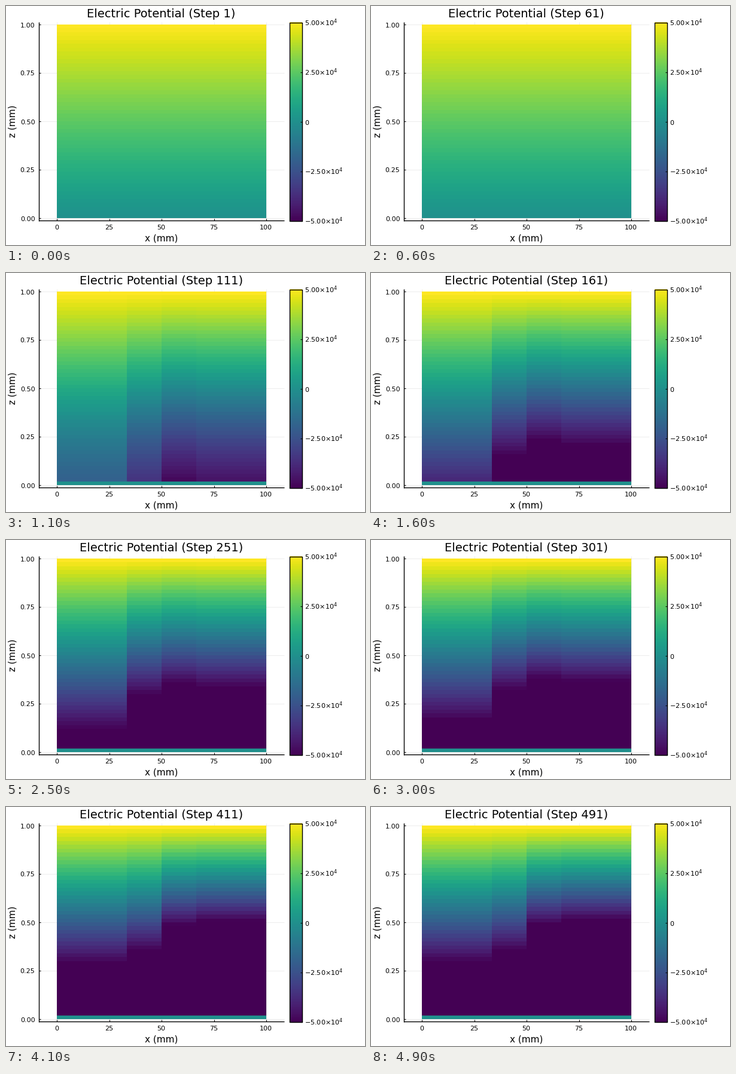
Write a matplotlib script that moves like this. It is 600 px wide and 400 px high and loops after 5 s.

```python
import numpy as np
import matplotlib.pyplot as plt
from matplotlib.animation import FuncAnimation

plt.rcParams["font.family"] = "DejaVu Sans"

FRAMES, INTERVAL = 50, 100
ROWS = 50
LEFT, RIGHT, TOP, BOTTOM = 85, 435, 31, 355        # heatmap, in pixels
AX_LEFT, AX_RIGHT, AX_TOP, AX_BOTTOM = 55.3, 465, 27, 359.3
BAR_LEFT, BAR_RIGHT, BAR_TOP, BAR_BOTTOM = 473.5, 494.5, 27.5, 360.3

ONSET = 6                   # first charge arrives after this frame
SURGE_START, SURGE_END = 35, 42
SAG_PEAK = 6
ZONE_OF_COLUMN = [0, 0, 1, 2, 3, 3]

# Per zone: start frame, first charge, its time constant, late surge (10 kV)
START, CHARGE, TAU, SURGE = np.array([
    (7.5, 8.4, 13, 1.3),
    (7.4, 10.4, 8.5, .2),
    (6, 12, 9.5, 2.9),
    (6, 11.7, 10, 4.2),
]).T


def smoothstep(t):
    t = np.clip(t, 0, 1)
    return t * t * (3 - 2 * t)


def surface_potential(frame):
    """Each zone charges up exponentially, surges once, then holds."""
    frame = min(frame, SURGE_END)
    age = np.maximum(frame - START, 0)
    surge = smoothstep((frame - SURGE_START) / (SURGE_END - SURGE_START))
    return -CHARGE * (1 - np.exp(-age / TAU)) - SURGE * surge


def sag(frame):
    """Dip caused by charge still in flight: a quick rise and slow decay."""
    age = max(min(frame, SURGE_END) - ONSET, 0) / 2
    return SAG_PEAK * age * np.exp(1 - age)


def potential(frame):
    z = np.arange(ROWS)[:, None] / (ROWS - 1)
    surface = surface_potential(frame)[ZONE_OF_COLUMN]
    field = surface + (5 - surface) * z - sag(frame) * z * (1 - z) ** 2
    field[0] = 0          # grounded plate
    return field


fig = plt.figure(figsize=(6, 4), dpi=100, facecolor="white")
ax = fig.add_axes([0, 0, 1, 1])
ax.axis("off")


def line(xs, ys, width=1.0, color="black", **kw):
    ax.plot(xs, ys, color=color, lw=width, solid_capstyle="butt", **kw)


def label(x, y, text, size=8, ha="center", va="baseline", **kw):
    return ax.text(x, y, text, fontsize=size, ha=ha, va=va, **kw)


def picture(data, extent):
    return ax.imshow(data, extent=extent, origin="lower", cmap="viridis",
                     vmin=-5, vmax=5, aspect="auto",
                     interpolation="nearest", zorder=2)


# Ticks and grid
for i in range(5):
    x = LEFT + (RIGHT - LEFT) * i / 4
    y = BOTTOM - (BOTTOM - TOP) * i / 4
    line([x, x], [AX_TOP, AX_BOTTOM], .5, alpha=.1, zorder=1)
    line([AX_LEFT, AX_RIGHT], [y, y], .5, alpha=.1, zorder=1)
    line([x, x], [AX_BOTTOM, AX_BOTTOM - 3], .8, zorder=3)
    line([AX_LEFT, AX_LEFT + 3], [y, y], .8, zorder=3)
    label(x - .5, 374, str(25 * i))
    label(48.5, y + .5, f"{i / 4:.2f}", ha="right", va="center_baseline")

line([AX_LEFT, AX_LEFT], [AX_TOP, AX_BOTTOM + .7], zorder=3)
line([AX_LEFT - .7, AX_RIGHT], [AX_BOTTOM, AX_BOTTOM], zorder=3)
label(260, 393, "x (mm)", 11)
label(11, 193, "z (mm)", 11, va="center", rotation=90)

# Colour bar
picture(np.linspace(-5, 5, 256)[:, None],
        (BAR_LEFT, BAR_RIGHT, BAR_BOTTOM, BAR_TOP))
line([BAR_LEFT, BAR_RIGHT, BAR_RIGHT, BAR_LEFT, BAR_LEFT],
     [BAR_TOP, BAR_TOP, BAR_BOTTOM, BAR_BOTTOM, BAR_TOP], zorder=3)
for value in np.linspace(-5, 5, 5):
    y = BAR_BOTTOM - (BAR_BOTTOM - BAR_TOP) * (value + 5) / 10
    line([BAR_RIGHT - 3, BAR_RIGHT], [y, y], .8, zorder=3)
    sign = "\u2212" if value < 0 else ""
    text = f"{sign}{abs(value):.2f}×10$^4$" if value else "0"
    label(499, y + 4.7, text, ha="left")

heat = picture(potential(0), (LEFT, RIGHT, BOTTOM, TOP))
title = label(259.5, 19, "", 14)
ax.set_xlim(0, 600)
ax.set_ylim(400, 0)


def update(frame):
    heat.set_data(potential(frame))
    title.set_text(f"Electric Potential (Step {1 + 10 * frame})")
    return heat, title


anim = FuncAnimation(fig, update, frames=FRAMES, interval=INTERVAL,
                     repeat=True, repeat_delay=0)
plt.show()
```
